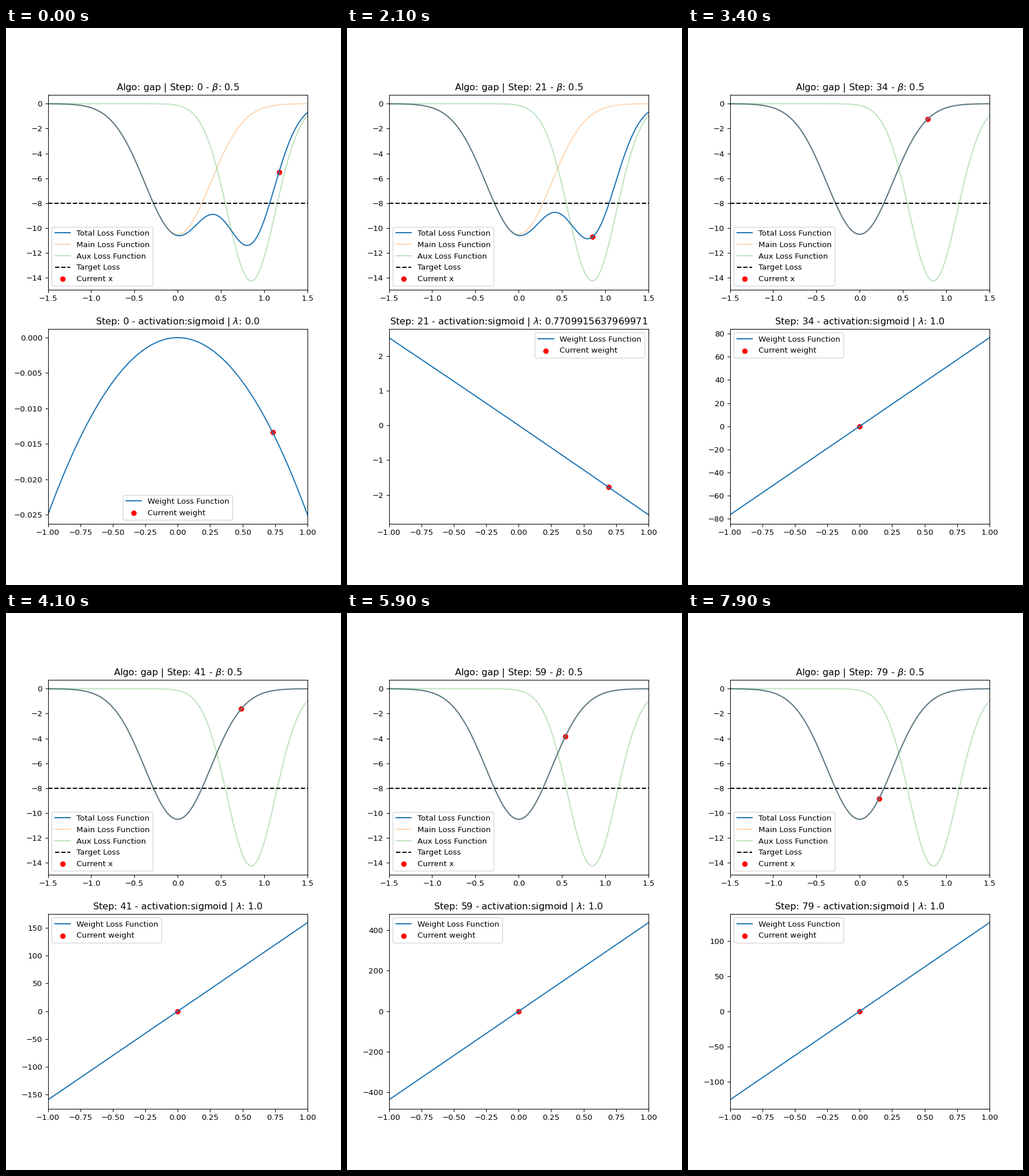
A matplotlib script for the animation above (8000 ms loop, 580x966 px).

```python
import numpy as np
import matplotlib.pyplot as plt
from matplotlib.animation import FuncAnimation

STEPS = 80
TARGET = -8
X_RATE, W_RATE = 0.001, 0.043
MAIN, AUX = (0.0, 0.38), (0.85, 0.28)
RAMP_START, RAMP = 19, 0.38549578189849854


def well(x, mu, sigma):
    peak = 10 / (sigma * np.sqrt(2 * np.pi))
    return -peak * np.exp(-((x - mu) ** 2) / (2 * sigma ** 2))


def slope(x, mu, sigma):
    return -well(x, mu, sigma) * (x - mu) / sigma ** 2


def total(x, w):
    return well(x, *MAIN) + w * well(x, *AUX)


def weight_loss(w, c):
    return c * w - 0.025 * w ** 2


def sigmoid(a):
    return 1 / (1 + np.exp(-a))


def mix(step):
    """Lambda: zero at first, then a linear ramp clipped at one."""
    return min(1.0, RAMP * max(0, step - RAMP_START))


def descend():
    """Gradient descent on x and on the logit of the auxiliary weight."""
    x, a, path = 1.17, 1.0, []
    for step in range(STEPS):
        w, lam = sigmoid(a), mix(step)
        g_main, g_aux = slope(x, *MAIN), slope(x, *AUX)
        c = -lam * g_main * g_aux
        path.append((x, w, lam, c))
        x -= X_RATE * (g_main + w * g_aux)
        a = a - W_RATE * c if lam else 0.672
    return path


path = descend()
xs = np.linspace(-1.5, 1.5, 1000)
ws = np.linspace(-1, 1, 1000)

plt.rcParams["font.family"] = "DejaVu Sans"
# 580 x 966 pixels
fig, (top, low) = plt.subplots(2, 1, figsize=(6.0042, 10.0001), dpi=96.6)

total_line, = top.plot(xs, total(xs, path[0][1]), label="Total Loss Function")
top.plot(xs, well(xs, *MAIN), alpha=0.3, label="Main Loss Function")
top.plot(xs, well(xs, *AUX), alpha=0.3, label="Aux Loss Function")
top.axhline(TARGET, color="black", linestyle="--", label="Target Loss")
x_dot = top.scatter([0], [TARGET], color="red", label="Current x")
top.set_xlim(-1.5, 1.5)
depth = -well(xs, *AUX).min()
top.set_ylim(-1.05 * depth, 0.05 * depth)
top.legend(loc="lower left")

weight_line, = low.plot(ws, weight_loss(ws, 0), label="Weight Loss Function")
w_dot = low.scatter([0], [0], color="red", label="Current weight")
low.set_xlim(-1, 1)
low_legend = low.legend(loc="lower center")


def update(step):
    x, w, lam, c = path[step]
    total_line.set_ydata(total(xs, w))
    x_dot.set_offsets([(x, total(x, w))])
    top.set_title(rf"Algo: gap | Step: {step} - $\beta$: 0.5")

    ys = weight_loss(ws, c)
    weight_line.set_ydata(ys)
    w_dot.set_offsets([(w, weight_loss(w, c))])
    pad = 0.05 * np.ptp(ys)
    low.set_ylim(ys.min() - pad, ys.max() + pad)
    low.set_title(rf"Step: {step} - activation:sigmoid | $\lambda$: {lam:}")
    if c == 0:
        low_legend.set_loc("lower center")
    else:
        low_legend.set_loc("upper right" if c < 0 else "upper left")
    return total_line, x_dot, weight_line, w_dot


anim = FuncAnimation(fig, update, frames=STEPS, interval=100,
                     repeat=True, repeat_delay=0, blit=False)
plt.show()
```
